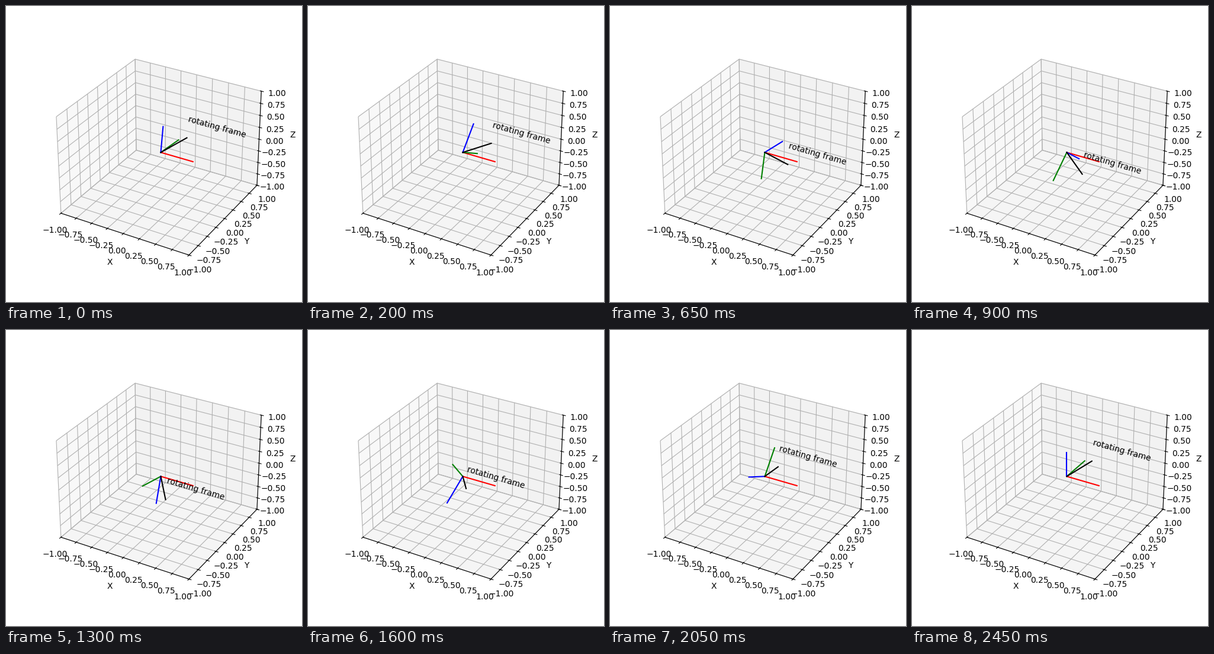
A matplotlib script that plays this animation: 500x500 px, repeating every 2500 ms.

```python
import numpy as np
import matplotlib.pyplot as plt
from matplotlib.animation import FuncAnimation

N_FRAMES = 50
AXIS_LENGTH = 0.5

fig = plt.figure(figsize=(5, 5), dpi=100)
ax = fig.add_subplot(111, projection="3d")
ax.set(xlim=(-1, 1), ylim=(-1, 1), zlim=(-1, 1),
       xlabel="X", ylabel="Y", zlabel="Z")

# Three basis vectors, then the pointer to the label.
lines = [ax.plot([0, 0], [0, 0], [0, 0], color=c)[0] for c in "rgbk"]
label = ax.text(0, 0, 0, "rotating frame", zdir="x")


def basis(angle):
    """Rows are the x, y and z axes after a turn about x."""
    c, s = np.cos(angle), np.sin(angle)
    return AXIS_LENGTH * np.array([[1, 0, 0], [0, c, -s], [0, s, c]])


def update(step):
    axes = basis(2 * np.pi * (step + 1) / N_FRAMES)
    anchor = axes.sum(axis=0) / 2
    for line, tip in zip(lines, [*axes, anchor]):
        line.set_data_3d(*([0, end] for end in tip))
    label.set_position_3d(anchor, zdir="x")
    return [*lines, label]


anim = FuncAnimation(fig, update, frames=N_FRAMES, interval=50,
                     repeat=True, repeat_delay=0, blit=False)
plt.show()
```
